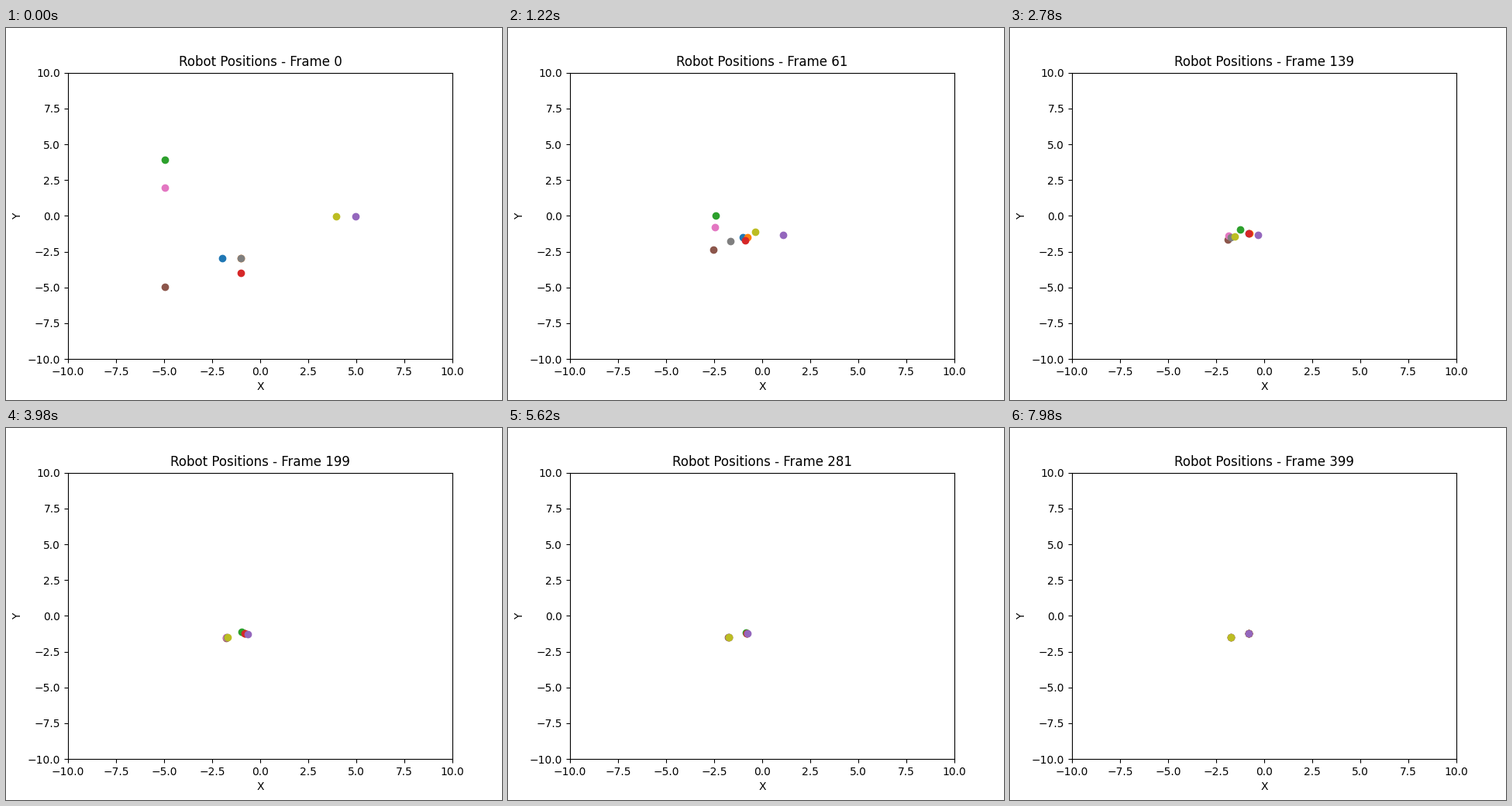
A matplotlib script that plays this animation: 640x480 px, repeating every 8000 ms.

```python
import numpy as np
import matplotlib.pyplot as plt
from matplotlib.animation import FuncAnimation

FRAMES = 400
GAIN = 0.0056     # consensus step per link
RESPONSE = 0.5    # share of the commanded velocity reached per step

START = np.array([(-2, -3), (-1, -3), (-5, 4), (-1, -4), (5, 0),
                  (-5, -5), (-5, 2), (-1, -3), (4, 0)], float)
TEAMS = [range(0, 5), range(5, 9)]


def link(weights, a, b, value):
    weights[a, b] = weights[b, a] = value


def build_laplacian():
    weights = np.zeros((len(START), len(START)))
    for team in TEAMS:
        for a in team:
            for b in team:
                if a != b:
                    weights[a, b] = 1
    link(weights, 2, 4, 0)       # out of range of each other
    link(weights, 1, 4, 1.1)
    link(weights, 3, 4, 0.9)
    link(weights, 6, 7, 1.3)
    return np.diag(weights.sum(axis=1)) - weights


def simulate():
    laplacian = build_laplacian()
    pos, vel = START.copy(), np.zeros_like(START)
    path = []
    for _ in range(FRAMES):
        command = -GAIN * laplacian @ pos
        vel += RESPONSE * (command - vel)
        pos = pos + vel
        path.append(pos)
    return path


path = simulate()

fig, ax = plt.subplots(figsize=(6.4, 4.8), dpi=100)
ax.set_xlim(-10, 10)
ax.set_ylim(-10, 10)
ax.set_xlabel("X")
ax.set_ylabel("Y")
title = ax.set_title("Robot Positions - Frame 0")
robots = [ax.plot([], [], "o", color=f"C{i}")[0] for i in range(len(START))]


def update(frame):
    title.set_text(f"Robot Positions - Frame {frame}")
    for robot, (x, y) in zip(robots, path[frame]):
        robot.set_data([x], [y])
    return [title, *robots]


anim = FuncAnimation(fig, update, frames=FRAMES, interval=20,
                     repeat=True, repeat_delay=0, blit=False)
plt.show()
```
